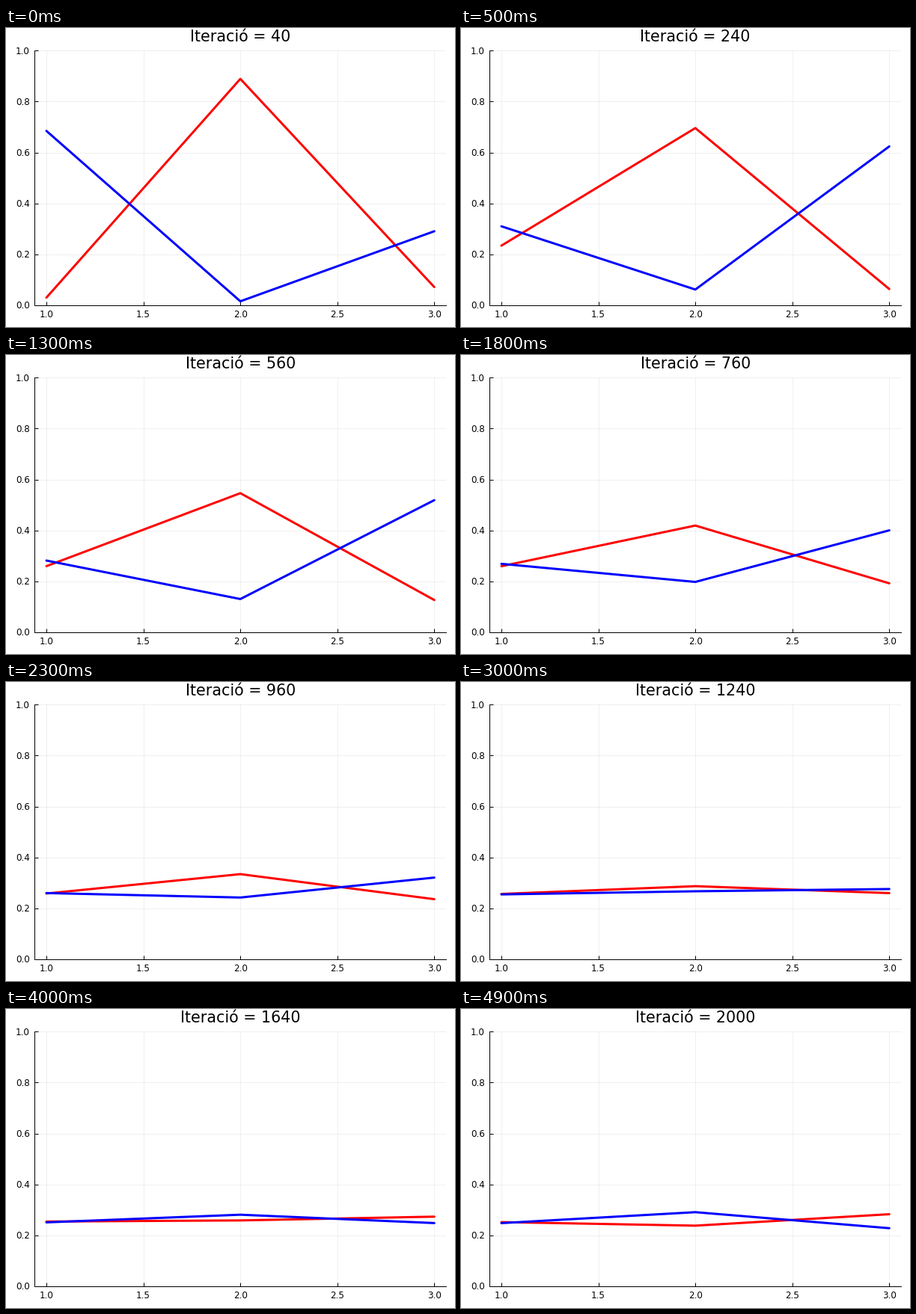
Animation of 600 by 400 pixels, one loop 5 s. Source, as a matplotlib script:

```python
import numpy as np
import matplotlib.pyplot as plt
from matplotlib.animation import FuncAnimation

W, H, DPI = 600, 400, 100
FRAMES, STEP = 50, 40
PX = 72 / DPI                      # one pixel in points
LEFT, RIGHT, TOP, BOTTOM = 38.4, 587.9, 30.35, 370.9

plt.rcParams["font.family"] = "DejaVu Sans"


def make_curve(start, swing, drift, kick, fade):
    """Three heights: a logistic swing, a steady drift and a fading first kick."""
    start, swing, drift, kick = map(np.array, (start, swing, drift, kick))

    def curve(n):
        logistic = 1 / (1 + np.exp((640 - n) / 150))
        decay = np.exp((STEP - n) / fade)
        return start + swing * logistic + drift * n / 1000 + kick * decay

    return curve


CURVES = {
    "red": make_curve(start=(.264, .710, .042), swing=(0, -.360, .189),
                      drift=(-.006, -.056, .026), kick=(-.234, .188, .025),
                      fade=95),
    "blue": make_curve(start=(.299, .044, .674), swing=(-.035, .193, -.336),
                       drift=(-.008, .027, -.055), kick=(.387, -.033, -.375),
                       fade=62),
}

fig = plt.figure(figsize=(W / DPI, H / DPI), dpi=DPI, facecolor="white")
ax = fig.add_axes([LEFT / W, 1 - BOTTOM / H,
                   (RIGHT - LEFT) / W, (BOTTOM - TOP) / H])
ax.set(xlim=(.94, 3.06), ylim=(0, 1),
       xticks=np.arange(1, 3.1, .5), yticks=np.arange(0, 1.1, .2))
ax.spines[["top", "right"]].set_visible(False)
ax.spines[["left", "bottom"]].set_linewidth(PX)
ax.tick_params(direction="in", length=5 * PX, width=PX,
               labelbottom=False, labelleft=False)
ax.set_axisbelow(True)
ax.grid(color="black", alpha=.06, linewidth=PX)


def label(x, y, text, size, ha="center"):
    return fig.text(x / W, 1 - y / H, text, fontsize=size, ha=ha, va="baseline")


for v in ax.get_xticks():
    label(LEFT + (v - .94) / 2.12 * (RIGHT - LEFT), 387.4, f"{v:.1f}", 8.6)
for v in ax.get_yticks():
    label(32, BOTTOM - v * (BOTTOM - TOP) + 4.4, f"{v:.1f}", 8.6, "right")
title = label((LEFT + RIGHT) / 2, 18.2, "", 14.9)

lines = {color: ax.plot([1, 2, 3], curve(STEP), color=color, linewidth=3 * PX,
                        solid_capstyle="round", solid_joinstyle="round",
                        clip_on=False)[0]
         for color, curve in CURVES.items()}


def update(frame):
    iteration = STEP * (frame + 1)
    title.set_text(f"Iteració = {iteration}")
    for color, line in lines.items():
        line.set_ydata(CURVES[color](iteration))
    return [title, *lines.values()]


anim = FuncAnimation(fig, update, frames=FRAMES, interval=100,
                     repeat=True, repeat_delay=0)
plt.show()
```
